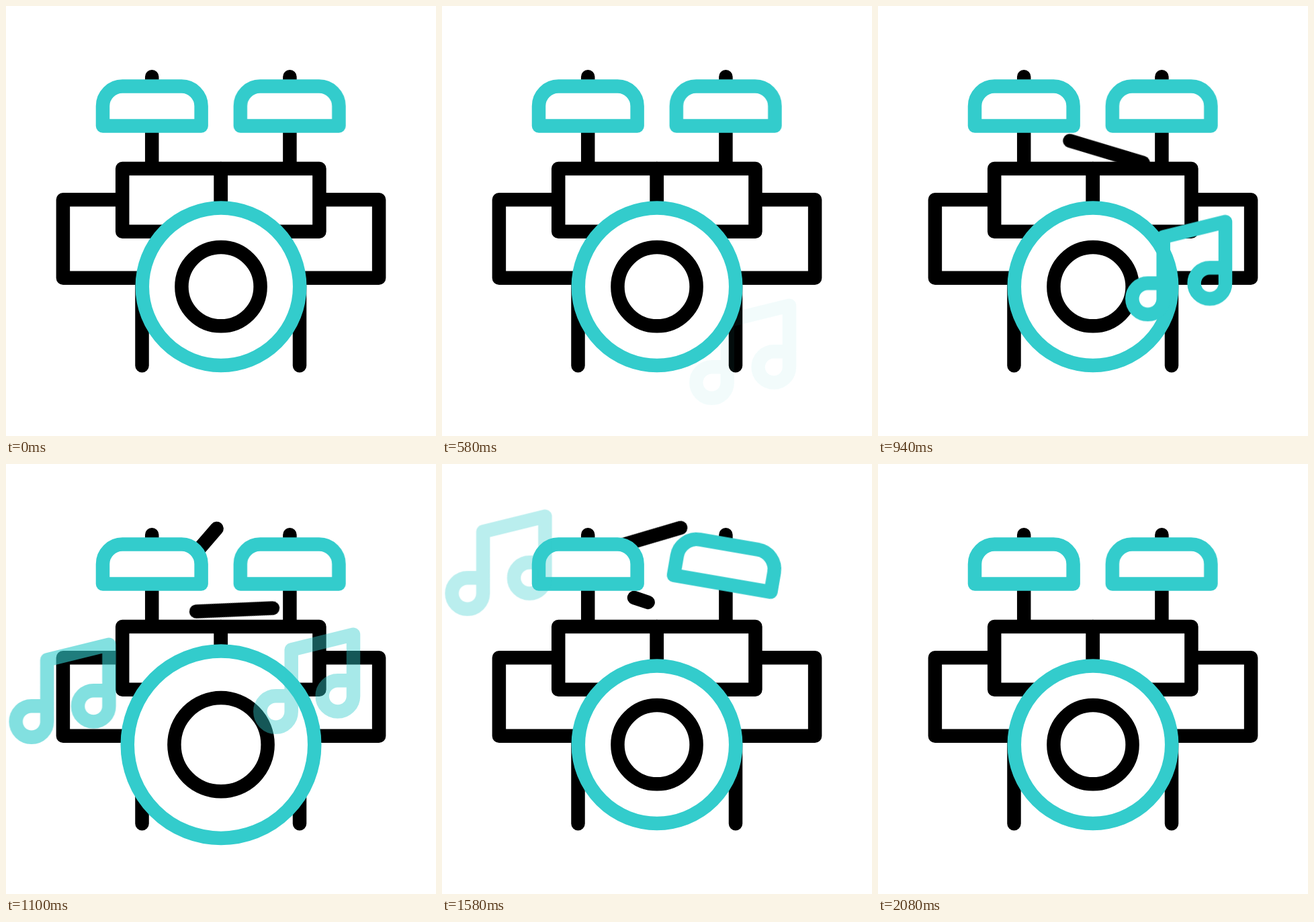
Write an HTML page without scripts that moves like this. It is 640 px wide and 640 px high and loops after 2.4 s.

```html
<!DOCTYPE html>
<html lang="en">
<head>
<meta charset="utf-8">
<title>Drum kit</title>
<style>
html, body { margin: 0; width: 100%; height: 100%; overflow: hidden; background: #fff; }
svg { display: block; width: 100vw; height: 100vh; }

.ink, .teal { fill: none; stroke: #000; stroke-width: 20.5; stroke-linecap: round; stroke-linejoin: round; }
.teal { stroke: #33cccc; }
.solid { fill: #fff; }

.kick, .tom, .cymbal, .stick, .stick line, .rise, .fade {
  animation: 2400ms cubic-bezier(.33, 0, .67, 1) infinite;
}

.kick { r: var(--r); animation-name: kick; }
@keyframes kick {
  0%, 13%, 24.75%, 37.75%, 39.33%, 52.33%, 100% { r: var(--r); }
  6.5%, 31.25%, 45.83% { r: calc(var(--r) * 1.188); }
}

.tom { animation-name: squash; }
@keyframes squash {
  0%, 48.33%, 61.67%, 100% { y: 242px; height: 93.7px; }
  55% { y: 270px; height: 65.7px; }
}

.cymbal { transform-origin: 217.3px 149px; animation-name: wobble; }
@keyframes wobble {
  0%, 52.92%, 86.67%, 100% { transform: rotate(0deg); }
  59.8%, 73.1% { transform: rotate(-10deg); }
  66.25%, 80% { transform: rotate(10deg); }
}

.stick line { stroke-dasharray: 100 300; opacity: 0; }
.low { transform-origin: 340px 217px; animation-name: tap; }
.low line { animation-name: draw-low; }
@keyframes tap {
  0%, 37.5%, 61.42%, 100% { transform: rotate(0deg); }
  47.92% { transform: rotate(-23.3deg); }
}
@keyframes draw-low {
  0%, 29.16% { stroke-dashoffset: 100; opacity: 0; }
  29.17% { stroke-dashoffset: 100; opacity: 1; }
  35.83%, 61.67% { stroke-dashoffset: 0; opacity: 1; }
  67.5% { stroke-dashoffset: -100; opacity: 1; }
  67.51%, 100% { stroke-dashoffset: -100; opacity: 0; }
}

.high { transform-origin: 300.7px 111px; animation-name: strike; }
.high line { animation-name: draw-high; }
@keyframes strike {
  0%, 48.42%, 73.33%, 100% { transform: rotate(0deg); }
  54.8%, 66.67% { transform: rotate(32.8deg); }
}
@keyframes draw-high {
  0%, 41.74% { stroke-dashoffset: 100; opacity: 0; }
  41.75% { stroke-dashoffset: 100; opacity: 1; }
  48.42%, 73.33% { stroke-dashoffset: 0; opacity: 1; }
  80% { stroke-dashoffset: -100; opacity: 1; }
  80.01%, 100% { stroke-dashoffset: -100; opacity: 0; }
}

.rise { animation-name: rise; animation-timing-function: linear; }
.fade { opacity: 0; animation-name: fade; animation-timing-function: linear; }
.late .rise { animation-delay: 483ms; }
.late .fade { animation-delay: 465ms; }
@keyframes rise {
  0%, 26.875% { transform: translateY(0); }
  48.54%, 100% { transform: translateY(-219px); }
}
@keyframes fade {
  0%, 23.96%, 48.75%, 100% { opacity: 0; }
  28.1%, 42.08% { opacity: 1; }
}
</style>
</head>
<body>
<svg viewBox="0 0 640 640">
  <defs>
    <path id="cymbal" class="teal solid" d="M144 178.5V149a29.4 29.4 0 0 1 29.4-29.4h87.8a29.4 29.4 0 0 1 29.4 29.4v29.5z"/>
    <path id="note" class="teal" d="M424.7 521.5a23.2 23.2 0 1 1-23.2-23.2h23.2M424.7 521.5V429.5L517 406.8V498.4a23.2 23.2 0 1 1-23.2-23.2H517"/>
  </defs>

  <g class="ink">
    <rect x="84.9" y="288.3" width="470.2" height="116.5"/>
    <path d="M202.5 415V535.3M437 415V535.3M217.2 105.3V275M422.4 105.3V242"/>
    <g class="stick high"><line x1="263.6" y1="154" x2="337.8" y2="68" pathLength="100"/></g>
    <g class="stick low"><line x1="394" y1="235" x2="286" y2="199" pathLength="100"/></g>
    <rect class="solid tom" x="173.2" y="242" width="146.6" height="93.7"/>
    <rect class="solid" x="319.8" y="242" width="146.6" height="93.7"/>
  </g>

  <use href="#cymbal"/>
  <g transform="translate(204.8)"><g class="cymbal"><use href="#cymbal"/></g></g>

  <circle class="teal solid kick" style="--r:117.2px" cx="320" cy="417.7" r="117.2"/>
  <circle class="ink kick" style="--r:58.6px" cx="320" cy="417.7" r="58.6"/>

  <g transform="translate(0 39)"><g class="rise"><use class="fade" href="#note"/></g></g>
  <g class="late" transform="translate(-363.6 -138)"><g class="rise"><use class="fade" href="#note"/></g></g>
</svg>
</body>
</html>
```
